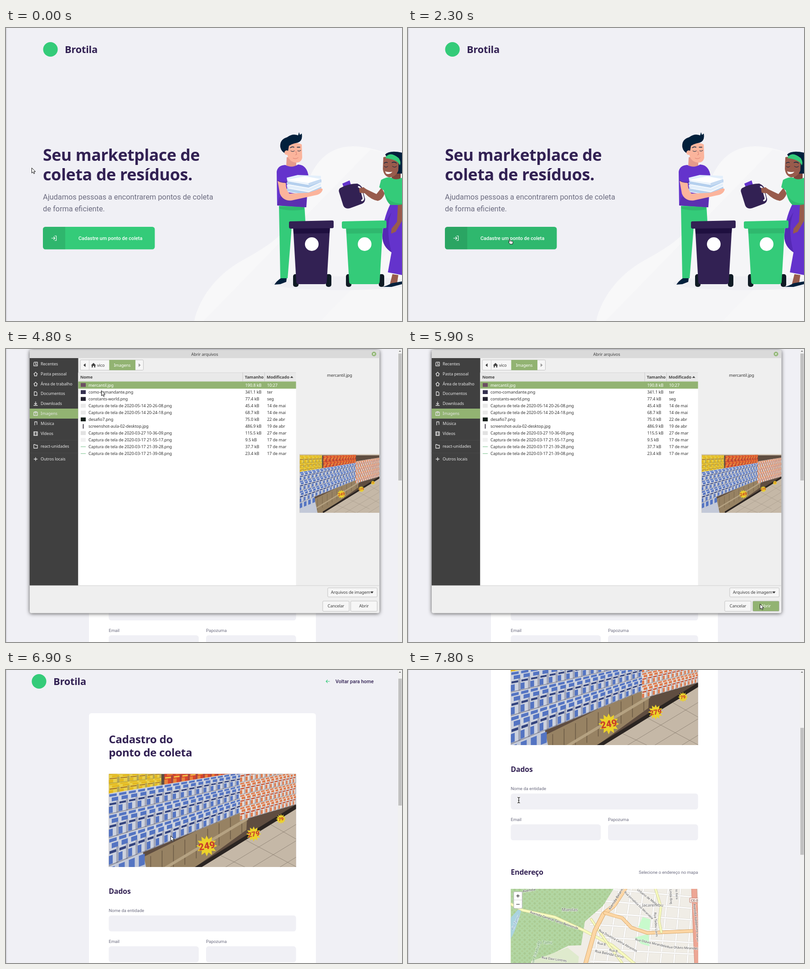
Animation of 869 by 644 pixels, one loop 8 s. Source, as an HTML page:

```html
<!DOCTYPE html>
<html lang="pt-BR">
<head>
<meta charset="utf-8">
<title>Brotila</title>
<style>
html, body { margin: 0; width: 100%; height: 100%; overflow: hidden; background: #f0f0f5; }
svg { display: block; }
#stage { position: absolute; left: 0; top: 0; }
text { font-family: Roboto, sans-serif; white-space: pre; }
.h { font-family: Ubuntu, "Noto Sans", "Open Sans", sans-serif; font-weight: 700; letter-spacing: -.01em; fill: #322153; }
.u text { font-family: Ubuntu, "Noto Sans", "Open Sans", sans-serif; letter-spacing: -.01em; }
.map text { font-family: "Noto Sans", "Open Sans", sans-serif; stroke: #fff; stroke-width: 1.6px; stroke-opacity: .7; paint-order: stroke; }
</style>
</head>
<body>
<svg id="stage" width="869" height="644" viewBox="0 0 869 644"></svg>
<script>
const GREEN = '#34cb79', DEEP = '#2fb86e', PLUM = '#322153', VIOLET = '#6433cc',
  NAVY = '#02203c', GREY = '#6c6c80', OLIVE = '#92b372', PEACH = '#fbb49c', BROWN = '#985b4c';

const R = (x, y, w, h, fill, r = 0, o = '') =>
  `<rect x="${x}" y="${y}" width="${w}" height="${h}" rx="${r}" fill="${fill}" ${o}/>`;
const P = (d, fill, o = '') => `<path d="${d}" fill="${fill}" ${o}/>`;
const L = (d, color, w = 1, o = '') =>
  `<path d="${d}" fill="none" stroke="${color}" stroke-width="${w}" stroke-linecap="round" stroke-linejoin="round" ${o}/>`;
const C = (x, y, r, fill, o = '') => `<circle cx="${x}" cy="${y}" r="${r}" fill="${fill}" ${o}/>`;
const T = (x, y, size, str, fill = '#333', o = '') =>
  `<text x="${x}" y="${y}" font-size="${size}" fill="${fill}" ${o}>${str}</text>`;
const H = (x, y, size, str) => T(x, y, size, str, PLUM, 'class="h"');
const MID = 'text-anchor="middle"', END = 'text-anchor="end"', MEDIUM = 'font-weight="500"';
const range = n => [...Array(n).keys()];
const pts = list => 'M' + list.map(p => p.map(v => v.toFixed(1)).join(' ')).join('L') + 'Z';

/* ---------- home ---------- */
function bin(x, body, band, lid) {
  return R(x + 9, 541, 12, 28, '#0f1a24', 5) + R(x + 81, 541, 12, 28, '#0f1a24', 5) +
    P(`M${x + 9} 436H${x + 90}L${x + 83} 557Q${x + 83} 563 ${x + 77} 563H${x + 22}Q${x + 16} 563 ${x + 16} 557Z`, body) +
    P(`M${x + 9.5} 440H${x + 89.7}L${x + 89} 451L${x + 10} 452Z`, band) +
    P(`M${x + 3} 425L${x + 95} 423Q${x + 98} 423 ${x + 98} 426V437Q${x + 98} 440 ${x + 95} 440L${x + 4} 441Q${x} 441 ${x} 437V428Q${x} 425 ${x + 3} 425Z`, lid) +
    C(x + 50, 475, 15, '#fff');
}

function papers() {
  const layers = range(4).map(i => {
    const y = 365 - i * 8;
    return P(`M${616 + i % 2} ${y - 6}L${664} ${y + 3}L${692 - i % 2} ${y - 9}V${y - 16}L640 ${y - 18}L616 ${y - 12}Z`, i % 2 ? '#e3effb' : '#b5d0ee') +
      L(`M618 ${y - 5}L664 ${y + 3}L691 ${y - 9}`, '#fff', 1.6);
  }).join('');
  return layers + P('M616 334L656 326L691 332L664 341Z', '#fff') + P('M664 341L691 332V339L664 347Z', '#c5daf2');
}

const man =
  P('M599 391H655L657 425H628L618 550H602Z', GREEN) + P('M600 393L653 393L654 399Q625 404 600 397Z', DEEP) +
  P('M589 564Q594 556 603 550H616L615 558L602 563Z', NAVY) +
  P('M616 284H637V303Q626 310 615 302Z', '#e59a8b') +
  P('M613 301Q627 309 641 300Q661 301 664 327L659 394L595 390L594 316Q596 302 613 301Z', VIOLET) +
  P('M600 372L659 356V394L595 390Z', '#5b2fb0') +
  P('M617 257Q632 248 649 256L650 285Q648 296 636 296Q618 293 617 275Z', PEACH) +
  P('M602 262Q600 245 617 240Q629 231 641 236L643 229L645 235L649 232Q652 248 640 252Q628 254 621 259L619 270L614 276Q604 272 602 262Z', NAVY) +
  C(616, 274, 5, PEACH) +
  L('M624 263Q628 260 632 262M639 262L645 262', NAVY, 1.5) +
  L('M625 270Q629 273 633 270M640 270Q644 272 647 269', NAVY, 1) +
  L('M636 271L638 278L635 279M630 286Q636 289 641 285', '#d97e70', 1) +
  papers() +
  P('M596 336L614 341Q614 357 622 364L664 362L682 356Q694 350 695 355Q692 366 677 368L627 379Q608 381 601 364Z', PEACH) +
  L('M596 335Q606 342 617 338', '#4d279a', 1.5);

const woman =
  P('M843 388H869V543L838 537L846 493Q826 480 826 458Q827 420 843 388Z', VIOLET) +
  P('M846 405Q832 440 846 493Q826 480 826 458Q828 430 846 405Z', '#5529b4') +
  P('M848 541L861 543L858 562L842 565Z', BROWN) + P('M826 569Q838 566 846 561L869 557V563L846 569Z', NAVY) +
  P('M849 318H866V336L855 342L845 334Z', '#7d473c') +
  P('M832 278Q842 268 869 274V320H858Z', NAVY) +
  P('M828 284Q843 279 862 290L861 313Q855 329 840 328Q829 325 827 310Z', BROWN) +
  P('M833 284Q843 270 862 286Q868 296 864 302Q860 289 833 286Z', GREEN) +
  L('M830 297Q834 294 837 296M847 296Q852 293 857 297', NAVY, 1.3) +
  L('M830 304Q834 308 838 304M848 304Q853 308 857 304', NAVY, 1) +
  P('M832 315Q839 318 848 316Q842 323 834 320Z', '#fff') +
  P('M824 351L831 364Q826 378 816 380Q802 378 787 363L776 362L775 354L784 350L792 355L813 365Z', BROWN) +
  P('M823 334Q836 326 846 329Q855 336 869 329V389H844Q833 381 829 357L819 350Z', GREEN) +
  P('M833 366Q840 385 869 386V389H844Q836 382 833 366Z', DEEP) +
  P('M869 388V424L855 448L845 452L846 441L858 426L860 389Z', BROWN);

const jug =
  P('M738 342L754 335L757 345L741 350Z', VIOLET) +
  P('M733 352Q751 342 771 342Q778 345 781 350L788 376Q788 383 782 386L755 396Q744 399 740 390L731 361Q729 355 733 352Z', PLUM) +
  L('M774 349Q778 350 780 358L784 373Q785 378 781 379', '#f4f4f7', 3.5) +
  P('M775 352L785 350L791 357L787 363L777 362Z', BROWN);

const home =
  P('M413 644C425 590 465 540 520 510C575 480 620 450 640 400C660 345 675 262 760 260C800 260 840 275 869 292V644Z', '#f8f8f9') +
  P('M433 644L800 267Q840 275 869 292V644Z', '#f5f5f7') +
  P('M690 644L869 462V644Z', '#f7f7f8') +
  '<ellipse cx="738" cy="561" rx="156" ry="15" fill="#efeff3"/>' +
  C(97.5, 47, 16, GREEN) + H(129, 55, 21.8, 'Brotila') +
  H(81, 292, 35.5, 'Seu marketplace de') + H(81, 334.5, 35.9, 'coleta de resíduos.') +
  T(81, 376.5, 16.33, 'Ajudamos pessoas a encontrarem pontos de coleta', GREY) +
  T(81, 402.5, 16.33, 'de forma eficiente.', GREY) +
  R(81, 437, 245.5, 49.5, GREEN, 5.5, 'id="btn"') +
  P('M86.500 437H130V486.500H86.500Q81 486.500 81 481V442.500Q81 437 86.500 437Z', '#000', 'opacity=".1"') +
  L('M107 457H110.500V467H107M100 462H107M104.500 459L107.500 462L104.500 465', '#fff', 1.1) +
  T(159, 465.5, 10.9, 'Cadastre um ponto de coleta', '#fff', MEDIUM) +
  man + jug + woman + bin(621, PLUM, '#1e0f3f', PLUM) + bin(737, GREEN, DEEP, GREEN);

/* ---------- shop photo ---------- */
// Rows of packs between two fans of lines: a = heights at x0, b = heights at x1
function packs(x0, x1, a, b, n, face, top, band) {
  const y = (k, x) => a[k] + (b[k] - a[k]) * (x - x0) / (x1 - x0);
  const at = i => x0 + (x1 - x0) * (1.3 * i / n - .3 * i * i / n / n);
  let out = '';
  for (let k = 0; k < a.length - 1; k++) for (let i = 0; i < n; i++) {
    const l = at(i), w = at(i + 1) - l;
    const h = (x, v) => y(k, x) + (y(k + 1, x) - y(k, x)) * v;
    const quad = (p, q, v, z, f) => {
      const [s, e] = [l + w * p, l + w * q];
      return P(pts([[s, h(s, v)], [e, h(e, v)], [e, h(e, z)], [s, h(s, z)]]), f);
    };
    out += quad(0, 1.03, 0, 1, face) +
      quad(.05, .8, .05, .17, top) + quad(.3, .95, .22, .4, top) +
      quad(.08, .75, .48, .58, band) + quad(0, .4, .64, .95, top) +
      quad(.76, 1, .4, 1, 'rgba(70,75,105,.32)') + quad(0, 1, .96, 1, 'rgba(50,50,70,.4)');
  }
  return out;
}

function tag(x, y, r, price) {
  const star = range(24).map(i => {
    const d = i % 2 ? r * .72 : r * 1.1, a = i * Math.PI / 12;
    return [x + d * Math.cos(a), y + d * Math.sin(a)];
  });
  return P(pts(star), '#ecd22a') + T(x, y + r * .35, r, price, '#c9402a', `${MID} font-weight="900" transform="rotate(-10 ${x} ${y})"`);
}

const shop =
  R(0, 0, 411, 303, '#5f4d40') + R(0, 0, 411, 6, '#d8cdbd') +
  packs(0, 115, [6, 48, 70, 94], [6, 40, 57, 76], 6, '#ead04a', '#e3b81e', '#a8762a') +
  packs(122, 290, [8, 40, 74], [4, 26, 50], 11, '#d8452c', '#e8823a', '#f1c04a') +
  P('M70 303L75 232L305 118L302 172L123 303Z', '#978263') +
  range(9).map(i => L(`M${92 + i * 25} ${230 - i * 12}V${290 - i * 14}`, '#6a5943', 1.5)).join('') +
  L('M80 282L303 148', '#b5a282', 6) +
  packs(0, 305, [92, 138, 190, 252], [42, 70, 98, 128], 18, '#cdd2de', '#5474c2', '#35457f') +
  P('M0 252L75 221L92 303H0Z', '#c3c9d8') +
  range(4).map(i => P(`M${i * 22} ${256 - i * 9}l13 -5v24l-13 5Z`, '#5474c2')).join('') +
  packs(288, 411, [38, 68, 95, 122, 152], [18, 43, 68, 92, 116], 13, '#e5ddd8', '#dd7a4c', '#c8502f') +
  P('M411 126L123 303H411Z', '#c5b8a7') +
  range(5).map(i => L(`M${190 + i * 55} ${262 - i * 34}L${290 + i * 70} ${303 - i * 20}M${175 + i * 60} 303L411 ${160 + i * 36}`, '#94887a', 1)).join('') +
  L('M411 121L123 299', '#2b2522', 8) +
  tag(215, 207, 21, '249') + tag(318, 181, 15, '279') + tag(378, 148, 10, '79');

const photo = (x, y, w, h, box) =>
  `<svg x="${x}" y="${y}" width="${w}" height="${h}" viewBox="${box}" preserveAspectRatio="none">${shop}</svg>`;

/* ---------- map ---------- */
const road = (d, fill, edge, w) => L(d, edge, w + 1.4) + L(d, fill, w);
const street = (x, y, a, str, s = 7.5, fill = '#444') => T(x, y, s, str, fill, `transform="rotate(${a} ${x} ${y})"`);
const marsh = 'M225 481H451L428 518L405 538L388 553L380 605L352 606L320 622L272 640V681H225Z';

const map = `<svg class="map" x="225.5" y="771" width="411" height="200" viewBox="225.5 481 411 200">` +
  R(225, 481, 412, 200, '#f0ede6') +
  range(9).map(i => road(`M${436 + i * 27} 481L${400 + i * 30} 681`, '#fff', '#dcd9d4', 2.6)).join('') +
  range(8).map(i => road(`M400 ${478 + i * 27}L636 ${500 + i * 25}`, '#fff', '#dcd9d4', 2.6)).join('') +
  P('M515 543L532 548L530 572L505 566Z', '#c8facc') + P('M497 588L528 580L530 607L512 602Z', '#c8facc') +
  P(marsh, '#b2d6a2') + P(marsh, 'url(#dots)') +
  P('M225 545L242 526L252 516L243 548L234 574L225 592Z', '#aad3df') +
  P('M270 640L320 622L350 610L375 630L370 681H270Z', '#dfeacd') +
  road('M225 514L252 528L322 543L385 572L448 605L540 681', '#f7fabf', '#c9c98a', 5) +
  road('M402 548L440 604L470 644', '#f7fabf', '#c9c98a', 4) +
  road('M476 481L452 518L429 536L410 573L390 644L380 681', '#fcd6a4', '#d09a57', 8) +
  road('M432 534L470 545L490 566L525 578L636 573', '#fcd6a4', '#d09a57', 6) +
  road('M543 481L555 520L551 552L556 576', '#f7fabf', '#c9c98a', 4) +
  road('M628 481L631 560L636 681', '#eda694', '#c87f6c', 11) +
  T(355, 530, 9.3, 'Marolas', '#666', MID) + T(537, 520, 9.3, 'Jacarembu', '#666', MID) +
  street(267, 534, 19, 'Avenida General Tarso Belmonde', 7.2) +
  street(252, 489, -10, 'Avenida') + street(444, 528, -58, 'Avenida Belarmi') +
  street(474, 489, 44, 'Rua Jornalista Ivo Mirandela', 6.5) +
  street(502, 484, 38, 'Urbano de Melga', 7) +
  street(418, 574, 29, 'Rua Doutora Celina Abrantos', 7) +
  street(410, 620, 12, 'Rua Belinda Corvo', 7.5) + street(415, 602, 12, 'Rua B', 7) + street(441, 617, 12, 'Rua B', 7) +
  street(498, 594, 13, 'Rua Otávio Mirandela', 7) + street(568, 611, 3, 'Rua Otávio Mirandela', 7) +
  street(540, 533, 86, 'Rua Tadeu Lorm', 7) + street(574, 482, 88, 'Linda Brej', 7) + street(587, 482, 88, 'io Xerx', 7) +
  street(626, 514, 84, 'Avenida Valdemiro Sarpe', 7.2) +
  street(293, 634, 8, 'Rua Davi Lontres', 7) +
  street(231, 572, -66, 'Rio Tamu', 8, '#5a87b0') +
  street(276, 644, -72, 'ue Estadual', 8, '#4f8b4a') + street(284, 602, 0, 'do Tamu', 8, '#4f8b4a') +
  R(618, 501, 22, 10, '#fbe3dc', 1, 'stroke="#b0604f" stroke-width=".7"') + T(621, 509, 7.5, 'CE-0', '#5b2a20') +
  R(232, 487.5, 18.5, 36.5, '#fff', 2, 'stroke="#b9b9b9" stroke-width="1.2"') +
  L('M232 505.500H250', '#ccc', .8) + L('M238 496.500H244.500M241.250 493.250V499.750M238 515H244.500', '#111', 1.2) + '</svg>';

/* ---------- form ---------- */
const label = (x, y, str, o) => T(x, y, 9.53, str, GREY, o);
const field = (x, y, w) => R(x, y, w, 35, '#f0f0f5', 5.5);

const form = `<g id="scroll">` +
  C(72.5, 47, 16, GREEN) + H(104, 55, 21.8, 'Brotila') +
  L('M710 47H702.500M705.500 43.800L702.300 47L705.500 50.200', GREEN, 1.1) +
  T(723, 51, 10.9, 'Voltar para home', PLUM, MEDIUM) +
  R(182, 117, 498, 1300, '#fff', 5.5) +
  H(225.5, 183, 24, 'Cadastro do') + H(225.5, 212, 24, 'ponto de coleta') +
  '<g id="drop">' + R(225.5, 250.5, 411, 204.5, '#e1faec', 7) +
  R(246.5, 271.2, 369.5, 163, 'none', 7, 'stroke="#4ecb79" stroke-dasharray="2 2"') +
  L('M424.800 345.500V350H437.500V345.500M431 346V337.500M427.500 341L431 337.500L434.500 341', '#4ecb79', 1.3) +
  T(431, 368, 10.9, 'Imagem do estabelecimento', '#333', MID) + '</g>' +
  '<g id="shop">' + photo(225.5, 250.5, 411, 204.5, '0 49 411 204.5') + '</g>' +
  H(225.5, 514, 15.8, 'Dados') +
  label(225.5, 554, 'Nome da entidade') + field(225.5, 561.5, 411) +
  label(225.5, 621.5, 'Email') + field(225.5, 629.3, 197.5) +
  label(439, 621.5, 'Papozuma') + field(439, 629.3, 197.5) +
  H(225.5, 739.5, 15.8, 'Endereço') + label(636.5, 737.5, 'Selecione o endereço no mapa', END) + map + '</g>' +
  R(860, 0, 9, 644, '#f1f1f1') + P('M862 6L864.500 3L867 6Z', '#777') +
  R(861, 10, 7.5, 279, '#c1c1c1', 0, 'id="thumb"');

/* ---------- file dialog ---------- */
const side = [
  [33, 'Recentes', 'M62 29H69V37H61V30M65 31V34H67'], [55, 'Pasta pessoal', 'M61 55L65 51L69 55M62.500 55V59H67.500V55'],
  [77, 'Área de trabalho', 'M61 77L65 73L69 77M62.500 77V81H67.500V77'], [98, 'Documentos', 'M62 94H66L68 96V102H62Z'],
  [120, 'Downloads', 'M65 116V122M62.500 119.500L65 122L67.500 119.500M61 124H69'], [142, 'Imagens', 'M61 139H69V146H61ZM63 138H67M65 141V143'],
  [164, 'Música', 'M63 167V160H68V166'], [186, 'Vídeos', 'M61 182H69V190H61ZM63 182V190M67 182V190'],
  [214, 'react-unidades', 'M61 210H64L65 211.500H69V218H61Z'], [242, 'Outros locais', 'M61.500 242H68.500M65 238.500V245.500']
];
const shot = 'Captura de tela de 2020-';
const files = [
  ['mercantil.jpg', '190.8 kB', '10:27', '#6d4f63'], ['como-comandante.png', '341.1 kB', 'ter', '#35304f'],
  ['constants-world.png', '77.4 kB', 'seg', '#252330'], [shot + '05-14 20-26-08.png', '45.4 kB', '14 de mai', '#e9e9e9'],
  [shot + '05-14 20-24-18.png', '68.7 kB', '14 de mai', '#e9e9e9'], ['desafio7.png', '75.0 kB', '22 de abr', '#15201c'],
  ['screenshot-aula-02-desktop.jpg', '486.9 kB', '19 de abr', ''], [shot + '03-27 10-36-09.png', '115.5 kB', '27 de mar', '#e2e2e2'],
  [shot + '03-17 21-55-17.png', '9.5 kB', '17 de mar', '#f1f1f1'], [shot + '03-17 21-39-28.png', '37.7 kB', '17 de mar', '-'],
  [shot + '03-17 21-39-08.png', '23.4 kB', '17 de mar', '-']
];
const S = (x, y, str, fill = '#3c3c3c', o = '') => T(x, y + 3.4, 9.1, str, fill, o);
const box = (x, y, w, h, o = '') => R(x, y, w, h, '#f6f6f6', 2, `stroke="#bdbdbd" stroke-width=".9" ${o}`);

function fileRow([name, size, day, icon], i) {
  const y = i ? 80 + i * 15 : 79.3, ink = i ? '#333' : '#fff';
  const thumb = icon === '-' ? R(164, y - 1, 11, 1.5, '#9fd3ae') :
    icon ? R(164, y - 4.5, 11, 8.5, icon) : R(168.5, y - 5, 2, 10, '#4a4450');
  return thumb + S(181, y, name, ink) + S(525, y, size, ink) + S(573, y, day, ink);
}

const dialog = `<g id="dialog" class="u">` +
  R(52, 2, 767.5, 578.5, '#efefef', 4, 'style="filter:drop-shadow(0 1px 4px rgba(0,0,0,.65))"') +
  P('M52 20V6Q52 2 56 2H815.500Q819.500 2 819.500 6V20Z', '#dadada') +
  S(436, 11.8, 'Abrir arquivos', '#404040', MID) +
  C(807.5, 11, 5, '#8fb573') + L('M805.700 9.200L809.300 12.800M809.300 9.200L805.700 12.800', '#fff', 1.1) +
  box(163, 24, 138.5, 22.5) + R(226.5, 24, 57.5, 22.5, OLIVE) + L('M182.500 24.500V46', '#c8c8c8', .8) +
  P('M174.500 31.500V39.500L170 35.500Z', '#333') + P('M291 31.500V39.500L295.500 35.500Z', '#999') +
  P('M186.500 36L192 30.500L197.500 36H196V40.500H193.500V37H190.500V40.500H188V36Z', '#444') +
  S(200, 35.5, 'vico') + S(255, 35.5, 'Imagens', '#fff', MID) +
  R(52, 20, 106.5, 500, '#404040') + R(52, 131, 106.5, 22, OLIVE) +
  L('M52 200.500H158M52 228.500H158', '#4b4b4b', .8) +
  side.map(([y, str, d]) => L(d, '#e2e2e2', 1.3) + S(76, y, str, '#e6e6e6')).join('') +
  R(158.5, 52, 478, 468, '#fff') + R(158.5, 52, 478, 19, '#e9e9e9') +
  L('M158.500 52H636M158.500 71H636', '#d0d0d0', .8) + L('M519.500 52V71M567.500 52V71', '#c4c4c4', .8) +
  S(163, 61.5, 'Nome', '#444', 'font-weight="600"') + S(524, 61.5, 'Tamanho', '#444', 'font-weight="600"') +
  S(572, 61.5, 'Modificado', '#444', 'font-weight="600"') + P('M623.500 63.500H630.500L627 59.500Z', '#444') +
  R(158.5, 71.5, 478, 15.7, OLIVE) + files.map(fileRow).join('') +
  S(732, 57.5, 'mercantil.jpg', '#333', MID) + photo(644.5, 231, 174.8, 129, '0 0 411 303') +
  L('M52 520H819', '#cfcfcf', 1) +
  box(706, 525, 108.5, 20) + S(713, 535, 'Arquivos de imagem') + P('M799.500 533H806.500L803 537.500Z', '#333') +
  box(695, 554, 58, 22.5) + S(724, 565, 'Cancelar', '#3c3c3c', MID) +
  box(756.5, 554, 58, 22.5, 'id="open"') + S(785.5, 565, 'Abrir', '#3c3c3c', MID + ' id="openText"') + '</g>';

/* ---------- pointer ---------- */
const beam = 'M.5 0Q3 0 3 1.500Q3 0 5.500 0M3 1.500V10.500M.5 12Q3 12 3 10.500Q3 12 5.500 12M2 6.500H4';
const cursor = '<g id="cursor">' +
  P('M.5 .5V11.800L3.200 9.400L5 13.400L6.900 12.500L5.200 8.700H8.700Z', '#fff', 'stroke="#111" stroke-width="1"') +
  P('M2 1Q3.500 0 4 1.500V5L8.500 5.600Q10.500 6 10.300 8L9.500 12H4L.8 8Q.3 6.500 2.200 7.200Z', '#fff', 'stroke="#111" stroke-width="1"') +
  `<g>${L(beam, '#fff', 2.4)}${L(beam, '#111', 1.2)}</g></g>`;

const stage = document.getElementById('stage');
stage.innerHTML =
  '<defs><pattern id="dots" width="11" height="10" patternUnits="userSpaceOnUse">' +
  '<circle cx="3" cy="3" r="1.7" fill="none" stroke="#9db877" stroke-width=".8"/>' +
  '<circle cx="8.5" cy="8" r="1.4" fill="none" stroke="#a9c084" stroke-width=".8"/></pattern></defs>' +
  `<g id="home">${home}</g><g id="form">${form}</g>${R(0, 0, 2, 644, '#d9d9df')}${dialog}${cursor}`;

const el = id => document.getElementById(id);
const show = (node, on) => { node.style.display = on ? '' : 'none'; };

// [time, x, y]
const path = [
  [0, 56, 307], [200, 63, 311], [300, 73, 317],
  [500, 128, 290], [600, 215, 242], [700, 325, 210], [800, 445, 202], [900, 555, 226], [1000, 625, 280],
  [1100, 643, 345], [1200, 605, 405], [1300, 523, 443],
  [1400, 470, 456], [1500, 412, 465], [1600, 360, 470], [1700, 314, 472], [1800, 282, 471], [1900, 258, 469],
  [2000, 242, 467], [2100, 232, 465], [2200, 225, 463], [2300, 220, 463],
  [3600, 278, 245], [3800, 352, 292], [3900, 411, 331], [4100, 414, 331],
  [4400, 238, 128], [4600, 220, 105], [4800, 209, 91], [4900, 207, 83], [5100, 220, 91],
  [5300, 480, 300], [5400, 683, 483], [5600, 796, 553], [5800, 782, 563], [5900, 772, 560],
  [6300, 761, 549], [6400, 582, 441], [6600, 361, 364], [7400, 294, 378], [7800, 240, 280]
];
// [time, scroll offset]
const scrolls = [[0, 0], [6900, 22], [7100, 132], [7200, 230], [7400, 290]];
// [time, scale, opacity]
const windowSteps = [[0, 1, 0], [4300, .906, .25], [4400, 1, 1], [6300, .906, .25], [6400, 1, 0]];
const stepAt = (table, t) => table.findLast(s => s[0] <= t);

function draw(t) {
  const [, x, y] = stepAt(path, t), [, top] = stepAt(scrolls, t), [, scale, alpha] = stepAt(windowSteps, t);
  const onForm = t >= 3500, hover = t >= 1700 && t < 3500, pressed = t >= 5800;
  show(el('home'), !onForm);
  show(el('form'), onForm);
  el('btn').setAttribute('fill', hover ? DEEP : GREEN);
  show(el('drop'), t < 6300);
  show(el('shop'), t >= 6300);
  el('scroll').setAttribute('transform', `translate(0 ${-top})`);
  el('thumb').setAttribute('y', 10 + top * .404);
  show(el('dialog'), alpha > 0);
  el('dialog').setAttribute('opacity', alpha);
  el('dialog').setAttribute('transform', `translate(435.7 291) scale(${scale}) translate(-435.7 -291)`);
  el('open').setAttribute('fill', pressed ? OLIVE : '#f6f6f6');
  el('openText').setAttribute('fill', pressed ? '#fff' : '#3c3c3c');
  const kind = t >= 7800 ? 2 : t >= 1700 && t < 3600 ? 1 : 0;
  [...el('cursor').children].forEach((c, i) => show(c, i === kind));
  el('cursor').setAttribute('transform', `translate(${x} ${y})`);
}

const start = performance.now();
function tick() {
  draw((performance.now() - start) % 8000);
  requestAnimationFrame(tick);
}
draw(0);
requestAnimationFrame(tick);
</script>
</body>
</html>
```
